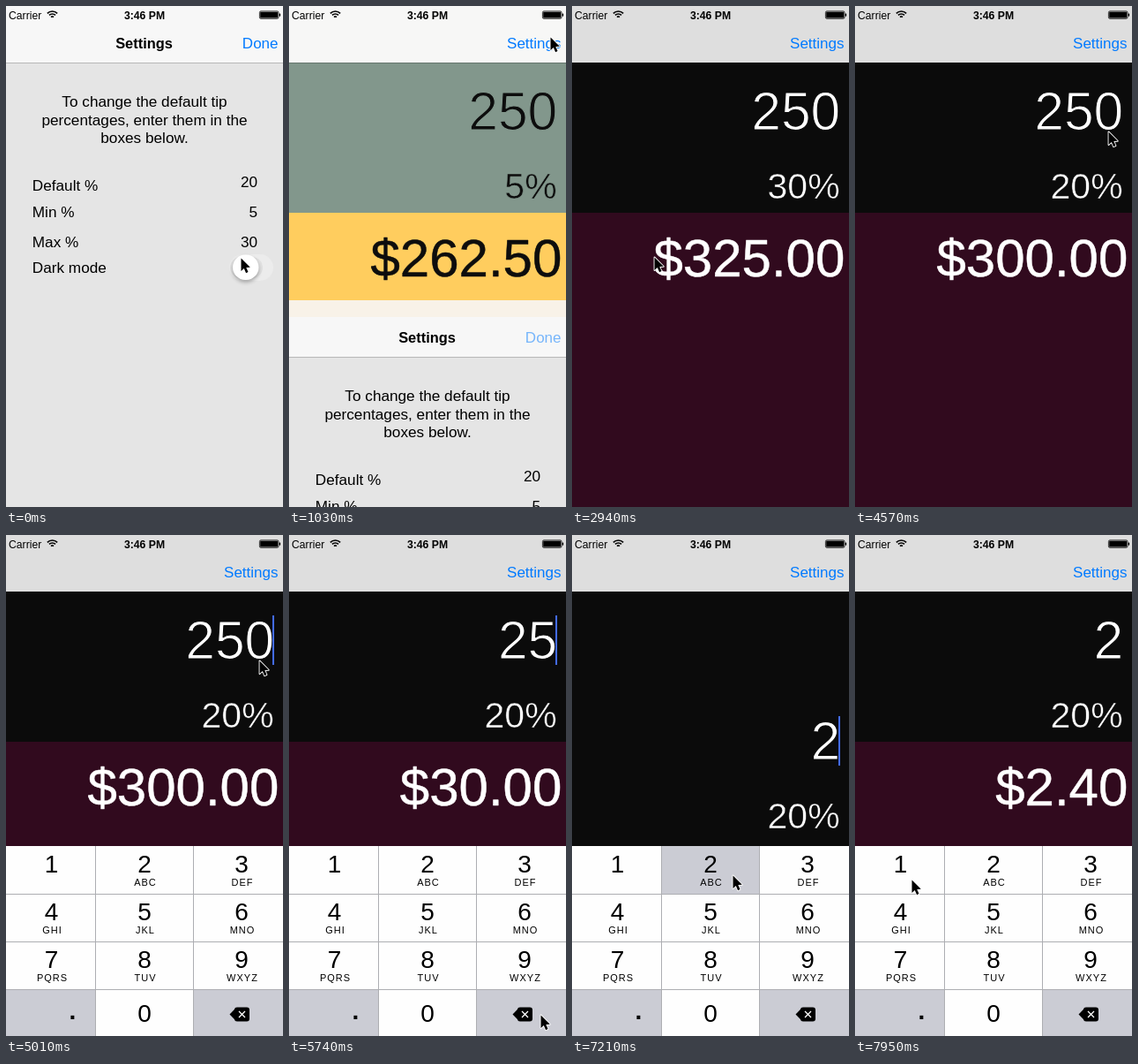
Recreate the animation shown at these times as an HTML page with a canvas. Size 314x567 px, loop 8000 ms.

```html
<!DOCTYPE html>
<html lang="en">
<head>
<meta charset="utf-8">
<title>Tip calculator</title>
<style>
html, body { margin: 0; width: 100%; height: 100%; overflow: hidden; background: #e5e5e5; }
canvas { display: block; width: 314px; height: 567px; }
</style>
</head>
<body>
<canvas id="stage"></canvas>
<script>
const W = 314, H = 567, LOOP = 8000;
const TICK = 147; // the screen refreshes in even steps; all times below count them
const FONT = '"Liberation Sans", Arial, sans-serif';
const BLUE = '#007aff';
const LIGHT = { nav: '#f7f7f6', line: '#66766e', top: '#82978c', panel: '#ffcd5e', ink: '#0d0d0d' };
const DARK = { nav: '#dedede', line: '#0b0b0b', top: '#0b0b0b', panel: '#310a1e', ink: '#ffffff' };

const canvas = document.getElementById('stage');
const ctx = canvas.getContext('2d');
const dpr = window.devicePixelRatio || 1;
canvas.width = W * dpr;
canvas.height = H * dpr;

// Pointer legs: leaves, arrives, and where it stops.
const REST = { x: 265, y: 285 };
const LEGS = [
  { from: 2, to: 5, x: 295, y: 35 },    // Done
  { from: 10, to: 14, x: 270, y: 288 },
  { from: 15, to: 20, x: 92, y: 284 },  // swipe
  { from: 21, to: 24, x: 261, y: 285 },
  { from: 24, to: 27, x: 66, y: 284 },  // swipe
  { from: 28, to: 31, x: 286, y: 142 }, // amount field
  { from: 34, to: 38, x: 284, y: 543 }, // delete key
  { from: 44, to: 48, x: 181, y: 385 }, // key 2
  { from: 50, to: 54, x: 63, y: 390 }
];

function smooth(t, a, b) {
  const k = Math.max(0, Math.min(1, (t - a) / (b - a)));
  return k * k * (3 - 2 * k);
}

function rect(x, y, w, h, color) {
  ctx.fillStyle = color;
  ctx.fillRect(x, y, w, h);
}

function pill(x, y, w, h, color, r = h / 2) {
  ctx.fillStyle = color;
  ctx.beginPath();
  ctx.roundRect(x, y, w, h, r);
  ctx.fill();
}

function text(str, x, y, size, { color = '#000', align = 'left', weight = 400, gap = 0 } = {}) {
  ctx.font = `${weight} ${size}px ${FONT}`;
  ctx.textAlign = align;
  ctx.letterSpacing = gap + 'px';
  ctx.fillStyle = color;
  ctx.fillText(str, x, y);
}

// Large figures: an outline in the ink thickens them, one in the background thins them.
function figures(str, x, y, size, color, outline, width) {
  text(str, x, y, size, { color, align: 'right' });
  ctx.strokeStyle = outline;
  ctx.lineWidth = width;
  ctx.lineJoin = 'round';
  ctx.strokeText(str, x, y);
}

function statusBar() {
  text('Carrier', 3, 14.5, 12.2);
  text('3:46 PM', 157, 14.5, 12.2, { align: 'center', weight: 700 });
  ctx.strokeStyle = '#000';
  ctx.lineWidth = 1.7;
  for (const r of [8, 5, 2]) {
    ctx.beginPath();
    ctx.arc(52.5, 14, r, -Math.PI * 0.75, -Math.PI * 0.25);
    ctx.stroke();
  }
  ctx.lineWidth = 0.8;
  ctx.beginPath();
  ctx.roundRect(287.4, 5.9, 21.6, 8.4, 1.5);
  ctx.stroke();
  rect(288.2, 6.7, 20, 6.8, '#000');
  rect(309.7, 8.6, 1.4, 3, '#000');
}

function toggle(on) {
  pill(253, 281, 50, 30, on ? '#4cd964' : '#ececec');
  if (!on) pill(254, 284, 37, 24, '#e1e1e1');
  ctx.save();
  ctx.shadowColor = 'rgba(0,0,0,.3)';
  ctx.shadowBlur = 4 * dpr;
  ctx.shadowOffsetY = 2.5 * dpr;
  pill(on ? 273 : 257, 281.5, 29.5, 28.5, '#fff');
  ctx.restore();
}

function settings(t) {
  const top = H * smooth(t, 4.47, 9);
  ctx.save();
  ctx.translate(0, top);
  rect(0, 0, W, H, '#e5e5e5');
  rect(0, 0, W, 64, '#f7f7f7');
  if (top > 0) rect(0, 0, W, 19, '#f8f2e8');
  rect(0, 64, W, 1, '#b8b8b8');
  text('Settings', 156.5, 48, 16.4, { align: 'center', weight: 700 });
  text('Done', 308.5, 48, 17, { color: top > 0 ? '#76b5fb' : BLUE, align: 'right' });
  ['To change the default tip', 'percentages, enter them in the', 'boxes below.']
    .forEach((line, i) => text(line, 157, 114 + i * 20.5, 17.2, { align: 'center' }));
  [['Default %', 209], ['Min %', 239], ['Max %', 273], ['Dark mode', 302]]
    .forEach(([label, y]) => text(label, 29.8, y, 17.2));
  [['20', 205], ['5', 239], ['30', 273]]
    .forEach(([value, y]) => text(value, 285, y, 17.2, { align: 'right' }));
  toggle(t >= 1);
  ctx.restore();
}

// One digit goes every second tick, then a 2 is typed.
const amountAt = t => t < 49 ? '250'.slice(0, Math.max(0, Math.min(3, 21 - Math.floor(t / 2)))) : '2';

function calculator(t) {
  const theme = t < 10 ? LIGHT : DARK;
  const percent = t < 18 ? 5 : t < 26 ? 30 : 20;
  const amount = amountAt(t);
  const drop = smooth(t, 42, 44) - smooth(t, 49, 51);
  const dy = 114 * drop, panelY = 234 + 118 * drop;
  rect(0, 0, W, H, theme.top);
  rect(0, 0, W, 64, theme.nav);
  rect(0, 64, W, 1, theme.line);
  text('Settings', 308.5, 48, 17, { color: BLUE, align: 'right' });
  figures(amount, 304.3, 140 + dy, 60.6, theme.ink, theme.top, 1.1);
  figures(percent + '%', 303.6, 218 + dy, 41, theme.ink, theme.top, 0.5);
  if (t >= 32 && t < 53) rect(302, 91 + dy, 2, 56, '#426bf2');
  rect(0, panelY, W, H, theme.panel);
  const total = '$' + (amount * (1 + percent / 100)).toFixed(2);
  figures(total, 309.3, panelY + 71.5, 60, theme.ink, theme.ink, 0.5);
}

function deleteIcon() {
  pill(259, 534.5, 17, 16, '#000', 3);
  ctx.beginPath();
  ctx.moveTo(253.5, 542.5);
  ctx.lineTo(261, 534.7);
  ctx.lineTo(261, 550.3);
  ctx.fill();
  ctx.strokeStyle = '#fff';
  ctx.lineWidth = 1.3;
  ctx.beginPath();
  for (const s of [-1, 1]) {
    ctx.moveTo(264, 542.5 - 3.5 * s);
    ctx.lineTo(271, 542.5 + 3.5 * s);
  }
  ctx.stroke();
}

function keyboard(t) {
  const GRAY = '#cbccd4', WHITE = '#fefefe', LINE = '#adaeb2';
  const rise = smooth(t, 32, 34);
  if (!rise) return;
  const deleting = amountAt(t).length < amountAt(t - 1).length;
  ctx.save();
  ctx.translate(0, (1 - rise) * 215);
  rect(0, 352, W, 215, WHITE);
  rect(0, 515, 101, 52, GRAY);
  rect(213, 515, 101, 52, deleting ? WHITE : GRAY);
  if (t === 49) rect(102, 352, 110, 54, GRAY);
  for (const y of [406, 460, 514]) rect(0, y, W, 1, LINE);
  for (const x of [101, 212]) rect(x, 352, 1, 215, LINE);
  const centers = [51.5, 157, 267];
  ['', 'ABC', 'DEF', 'GHI', 'JKL', 'MNO', 'PQRS', 'TUV', 'WXYZ'].forEach((letters, i) => {
    const x = centers[i % 3], y = 382 + 54 * Math.floor(i / 3);
    text(String(i + 1), x, y, 28, { align: 'center' });
    text(letters, x + 1, y + 15, 11, { align: 'center', gap: 1 });
  });
  text('0', 157, 551, 28, { align: 'center' });
  text('.', 75.5, 548, 28, { align: 'center', weight: 700 });
  deleteIcon();
  ctx.restore();
}

function pointer(t) {
  let { x, y } = REST;
  for (const leg of LEGS) {
    const k = smooth(t, leg.from, leg.to);
    x += (leg.x - x) * k;
    y += (leg.y - y) * k;
  }
  ctx.save();
  ctx.translate(x + 1.5, y + 0.5);
  ctx.beginPath();
  [[0, 0], [0, 14.5], [3.3, 11.4], [5.6, 16.7], [8, 15.6], [5.8, 10.5], [10.3, 10.3]]
    .forEach(([px, py]) => ctx.lineTo(px, py));
  ctx.closePath();
  ctx.lineJoin = 'round';
  ctx.lineWidth = 1.8;
  ctx.strokeStyle = '#fff';
  ctx.stroke();
  ctx.fillStyle = '#000';
  ctx.fill();
  ctx.restore();
}

function draw(t) {
  ctx.setTransform(dpr, 0, 0, dpr, 0, 0);
  calculator(t);
  if (t < 9) settings(t);
  keyboard(t);
  statusBar();
  pointer(t);
}

const start = performance.now();
function frame() {
  const time = (performance.now() - start) % LOOP;
  draw(Math.floor(time / TICK));
  requestAnimationFrame(frame);
}
frame();
</script>
</body>
</html>
```
